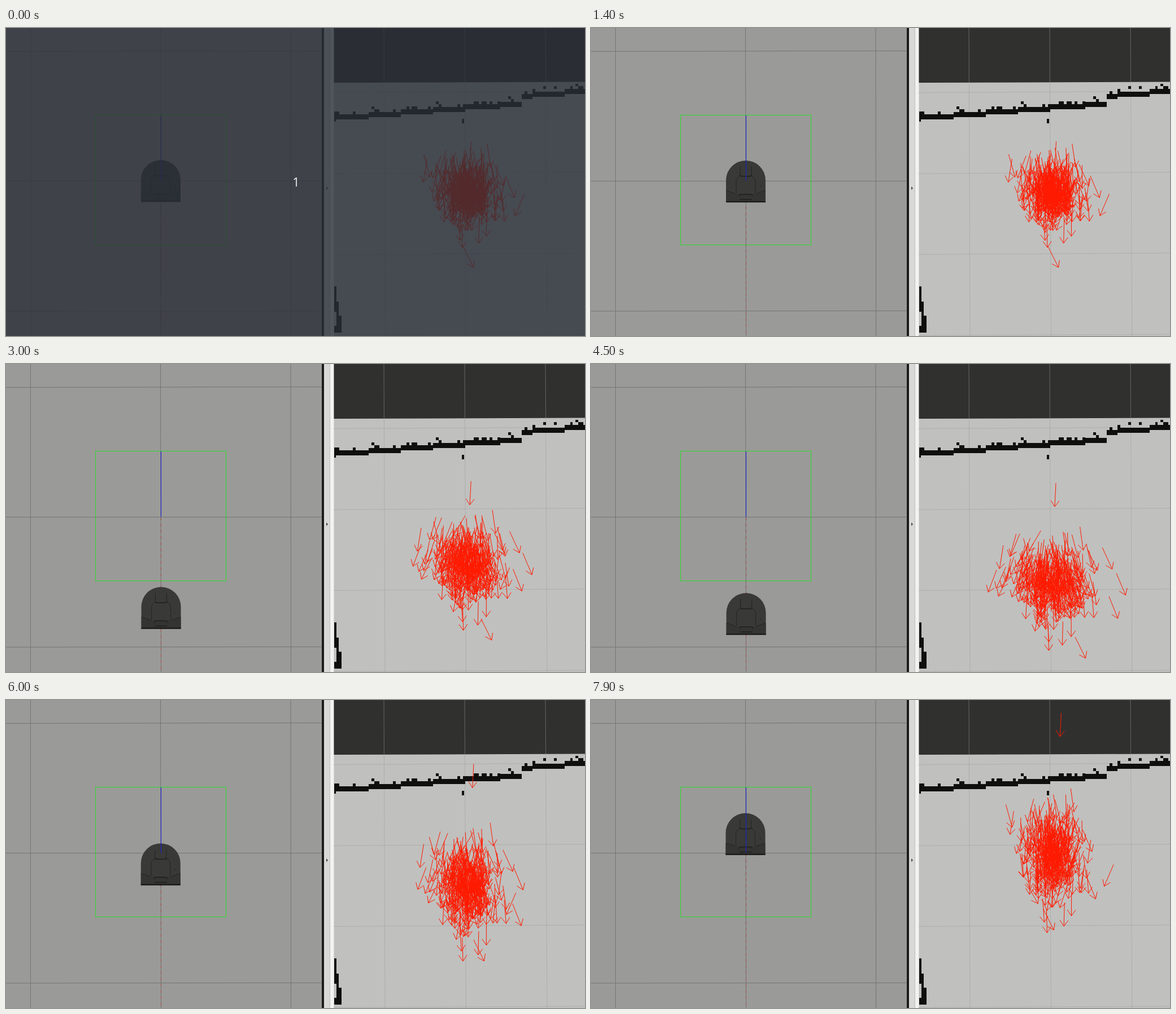
An HTML page for the animation above (8000 ms loop, 1025x546 px).

```html
<!DOCTYPE html>
<html lang="en">
<head>
<meta charset="utf-8">
<title>Robot pose cloud</title>
<style>
  html, body { margin: 0; width: 100%; height: 100%; overflow: hidden; background: #9a9a98; }
  svg { display: block; width: 100%; height: 100%; }
  path { fill: none; }
  .floor-grid { stroke: #747473; }
  .map-grid { stroke: #9c9c9c; stroke-opacity: .5; }
  .crisp { shape-rendering: crispEdges; }
  .detail { stroke: #1f1f1e; }
  #arrows { stroke: #ff1a00; }
  #shade text { font: 21px "Open Sans", "Noto Sans", sans-serif; fill: #f2f2f2; text-anchor: middle; }
</style>
</head>
<body>
<svg viewBox="0 0 1025 546">
  <!-- simulator view -->
  <rect width="560" height="546" fill="#9a9a98"/>
  <path class="floor-grid" d="M43.5 0V546M273.5 0L274.5 546M504 0L504.6 546M0 41.5L560 40.5M0 271.5H560M0 502L560 501.3"/>
  <path class="crisp" d="M274.5 272V546" stroke="#a2504e" stroke-dasharray="5 6"/>
  <g id="robot">
    <path d="M0 74V35A35 35 0 0 1 70 35V74Z" style="fill:#393937"/>
    <path d="M0 53L18 59H52L70 53V74H0Z" style="fill:#343432"/>
    <rect y="72" width="70" height="2.3" fill="#191918"/>
    <path class="detail" stroke-opacity=".75" d="M0.5 53L17 59M69.5 53L53 59M18 58V37Q18 30 25 27M52 58V37Q52 30 45 27M25 11V26M45 11V26"/>
    <path class="detail" stroke-width="1.5" d="M24 26Q26 28 30 28H40Q44 28 46 26M23 63Q24 60 27 60H43Q46 60 47 63M24 69H46"/>
    <circle cx="61" cy="46" r="1" fill="#262625"/>
  </g>
  <path class="crisp" d="M158.5 154.5H389.5V384.5H158.5Z" stroke="#2cdc2c"/>
  <path class="crisp" d="M274.5 155V271" stroke="#1c1cdc"/>

  <!-- splitter -->
  <g class="crisp">
    <rect x="559" width="4" height="546" fill="#1c1c1c"/>
    <rect x="563" width="11" height="546" fill="#d8d8d6"/>
    <rect x="573" width="1" height="546" fill="#c0c0be"/>
    <rect x="574" width="7" height="546" fill="#f2f2f0"/>
  </g>
  <path d="M567 281L570 284L567 287Z" style="fill:#444"/>

  <!-- map view -->
  <rect x="580.5" width="445" height="546" fill="#c0c0be"/>
  <path d="M580.5 0H1025V95.5L580.5 97Z" style="fill:#30302f"/>
  <path class="map-grid" d="M669 0L671 546M812 0L814.3 546M955 0L957.8 546M580 114.5L1025 112.3M580 258.3L1025 255.5M580 401.5L1025 399M580 545.3L1025 543"/>
  <path id="walls" class="crisp" style="fill:#0f0f0e"/>
  <path id="arrows"/>

  <g id="shade">
    <rect width="1025" height="546" fill="#292d36" fill-opacity=".8"/>
    <text x="513.5" y="280.5">1</text>
  </g>
</svg>
<script>
const LOOP = 8000, STEP = 100;
const el = id => document.getElementById(id);

let seed = 20;
const rand = () => (seed = (seed * 16807) % 2147483647) / 2147483647;
const bell = () => (rand() + rand() + rand() - 1.5) * 2;
// A bell with a denser core and longer tails.
const peaked = () => bell() * (0.5 + 1.1 * rand());

// The wall climbs one cell every RUN pixels, with a jump of three cells at JUMP.
function buildWalls() {
  const CELL = 4.75, RUN = 58, JUMP = 909;
  const box = (x, y, w, h) => `M${x} ${y}h${w}v${h}h${-w}Z`;
  let d = box(806.5, 160.5, CELL, 8.5) + box(580.5, 153, 3, 13);
  for (let x = 580.5; x < 1025; x += CELL) {
    const row = Math.floor((x - 580.5) / RUN) + (x > JUMP ? 3 : 0);
    const top = 153 - row * 4.5;
    const bump = rand() < 0.25 ? CELL : 0;
    d += box(x, top - bump, CELL, 9 + bump);
    if (rand() < 0.06) d += box(x, top - 2 * CELL, CELL, CELL);
  }
  // Corner piece, stepping outwards towards the bottom.
  return d + box(580.5, 458, 4, 45) + box(584.5, 485, 4.5, 55) +
    box(589, 510, 5, 30) + box(580.5, 528, 4, 12);
}
el("walls").setAttribute("d", buildWalls());

// Robot: one leg down, one leg back up, each speeding up slightly.
const HOME = 234, DOWN = 173, UP = 206.5;
const leg = (t, start, length) =>
  Math.min(1, Math.max(0, (t - start) / length)) ** 1.17;
const legs = t => [leg(t, 1380, 1720), leg(t, 4480, 1966)];
const robotY = t => {
  const [down, up] = legs(t);
  return HOME + DOWN * down - UP * up;
};

// Pose cloud: the filter follows the robot in jumps, seen at map scale with a short lag.
const UPDATES = [0, 2300, 2700, 3200, 5200, 5700, 6200, 6700];
const COUNT = 320, LENGTH = 42, LAG = 100, SCALE = 0.57;
const drift = at => (robotY(at - LAG) - HOME) * SCALE;
const particles = Array.from({ length: COUNT }, () => ({ x: peaked(), y: peaked(), turn: bell() * 0.22 }));

// Outliers: tail at the far end of the drive, heading, and speed on the way out and back.
const strays = [
  { x: 857, y: 484, turn: 0.46, out: 1.1, back: 1.08 },
  { x: 823, y: 211, turn: -0.05, out: 0.1, back: 1.6 },
  { x: 930, y: 371, turn: 0.4, out: 1.2, back: 1.3 },
  { x: 917, y: 412, turn: 0.38, out: 1.6, back: 0.9 },
  { x: 718, y: 365, turn: -0.36, out: 1.5, back: 1.2 }
];

function arrow(x, y, turn) {
  const point = (px, py, reach, angle) => [px + reach * Math.sin(angle), py + reach * Math.cos(angle)];
  const tip = point(x, y, LENGTH, turn);
  const barb = side => point(...tip, -13, turn + side * 0.61);
  const text = p => p.map(v => v.toFixed(1)).join(" ");
  return `M${text([x, y])}L${text(tip)}M${text(barb(-1))}L${text(tip)}L${text(barb(1))}`;
}

function cloud(at) {
  const moved = drift(at), left = drift(4000) - moved;
  const spreadX = 22, spreadY = 24 + at / 550;
  const body = particles.map(({ x, y, turn }) => {
    const reach = moved - LENGTH / 2;
    return arrow(817 + x * spreadX + reach * Math.sin(turn),
      284 + y * spreadY + reach * Math.cos(turn), turn);
  });
  const edge = strays.map(({ x, y, turn, out, back }) => {
    const reach = left * (at < 4000 ? out : back);
    return arrow(x - reach * Math.sin(turn), y - reach * Math.cos(turn), turn);
  });
  return body.concat(edge).join("");
}
const clouds = UPDATES.map(cloud);

let shown = -1;
function draw(now) {
  const t = Math.floor((now % LOOP) / STEP) * STEP;
  const [down, up] = legs(t);
  el("robot").setAttribute("transform", `translate(${239 + 0.6 * down - 1.1 * up} ${robotY(t)})`);
  el("shade").style.display = t < 100 ? "" : "none";
  const current = UPDATES.filter(at => at <= t).length - 1;
  if (current !== shown) {
    shown = current;
    el("arrows").setAttribute("d", clouds[current]);
  }
}

const start = performance.now();
function tick() {
  draw(performance.now() - start);
  requestAnimationFrame(tick);
}
tick();
</script>
</body>
</html>
```
